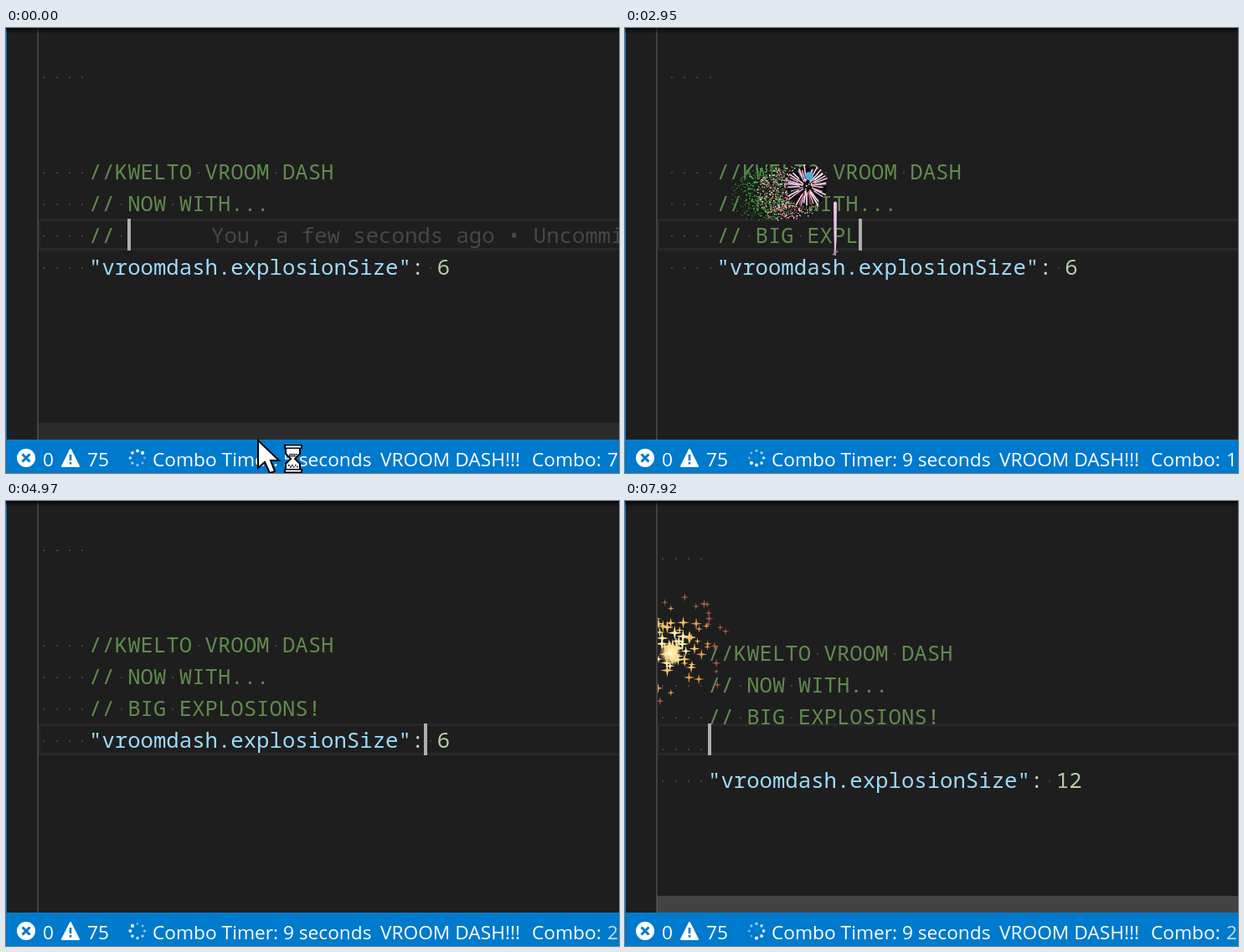
Animation of 732x532 px, one loop 8 s. Source, as an HTML page with a canvas:

```html
<!DOCTYPE html>
<html lang="en">
<head>
<meta charset="utf-8">
<title>Typing fireworks</title>
<style>
  html, body { margin: 0; width: 732px; height: 532px; overflow: hidden; background: #1e1e1e; }
  canvas { display: block; }
</style>
</head>
<body>
<canvas id="stage" width="732" height="532"></canvas>
<script>
const ctx = document.getElementById('stage').getContext('2d');
const LOOP = 8000, W = 732, H = 532, BAR = 492;
const LEFT = 37.4, CH = 15.4;
const CODE = '25.67px "Noto Sans Mono", "DejaVu Sans Mono", monospace';
const UI = '22.7px "Open Sans", "Noto Sans", sans-serif';
const GREEN = '#608b4e';

const PHRASE = 'BIG EXPLOSIONS!';
const KEYS = [1770, 1920, 2080, 2240, 2470, 2620, 2780, 2900,
              3100, 3260, 3420, 3590, 3700, 3790, 3970];
const EDITS = [5710, 5870, 6050, 7690];
const PRESSES = KEYS.concat(EDITS);

// start, x, y, kind, scale
const BLASTS = [
  [1770, 142, 190, 'rays', 1], [1920, 157, 190, 'rays', 1],
  [2080, 173, 188, 'rays', 1], [2240, 188, 190, 'rays', 1],
  [2470, 204, 188, 'rays', 1], [2620, 217, 189, 'rays', 1],
  [2900, 251, 188, 'rays', 1],
  [3140, 222, 206, 'teal', 1], [3220, 312, 208, 'pink', 1],
  [3260, 252, 212, 'pink', 1], [3300, 257, 190, 'fall', 1],
  [3420, 340, 214, 'pink', 1], [3400, 295, 212, 'teal', .9],
  [3600, 259, 181, 'ring', 1], [3630, 320, 181, 'ring', 1],
  [3640, 351, 181, 'ring', 1], [3580, 362, 207, 'stars', 1],
  [3760, 266, 203, 'flash', 1], [3970, 366, 206, 'stars', .95],
  [5720, 44, 236, 'rays', .8], [6270, 52, 228, 'rays', .87],
  [7690, 52, 212, 'rocket', 1], [7910, 54, 176, 'stars', 1.9]
];

const count = (list, t) => list.filter(k => k <= t).length;
const rowY = r => 58 + 38 * r;
const clamp = v => Math.max(0, Math.min(1, v));

function rng(seed) {
  let i = 0;
  return () => {
    const v = Math.sin(++i * 12.9898 + seed * 78.233) * 43758.5453;
    return v - Math.floor(v);
  };
}

function rect(color, x, y, w, h) {
  ctx.fillStyle = color;
  ctx.fillRect(x, y, w, h);
}

function disc(color, x, y, r) {
  ctx.fillStyle = color;
  ctx.beginPath();
  ctx.arc(x, y, r, 0, 7);
  ctx.fill();
}

function poly(points, fill, stroke) {
  ctx.beginPath();
  points.forEach(p => ctx.lineTo(p[0], p[1]));
  ctx.closePath();
  if (fill) { ctx.fillStyle = fill; ctx.fill(); }
  if (stroke) { ctx.strokeStyle = stroke; ctx.lineWidth = 2; ctx.stroke(); }
}

function label(text, x, y, color) {
  ctx.fillStyle = color;
  ctx.fillText(text, x, y);
}

// ---- editor ----

function shake(t) {
  if (t < 1770 || (t >= 4820 && t < 5710)) return [0, 0];
  if (t >= 6530) return [0, 10];
  return [10.4, 0];
}

function caret(t) {
  let c = { row: 5, col: 7, since: 0 };
  const n = count(KEYS, t);
  if (n) c = { row: 5, col: 7 + n, since: KEYS[n - 1] };
  const moves = [[4820, 6, 22], [4900, 6, 30], [5150, 6, 32], [5710, 6, 31],
                 [5870, 6, 32], [6050, 6, 33], [7230, 5, 22], [7690, 6, 4]];
  for (const [since, row, col] of moves) if (t >= since) c = { row, col, since };
  return c;
}

// parts: [text, color] pairs laid out on the character grid
function codeLine(row, parts, dx, dy) {
  let col = 0;
  const y = rowY(row) + dy;
  for (const [text, color] of parts) {
    label(text, LEFT + dx + col * CH, y + 9, color);
    for (const ch of text) {
      if (ch === ' ') rect('#424242', Math.round(LEFT + dx + (col + .5) * CH - 1), y, 2, 2);
      col++;
    }
  }
}

function editor(t) {
  const [dx, dy] = shake(t), c = caret(t), y = rowY(c.row);
  const box = '#282828';
  rect(box, 39, y - 20, W, 3);
  rect(box, 39, y + 15, W, 3);
  rect(box, 39, y - 20, 2, 38);

  ctx.font = CODE;
  const indent = ['    ', GREEN];
  codeLine(0, [indent], dx, dy);
  codeLine(3, [indent, ['//KWELTO VROOM DASH', GREEN]], dx, dy);
  codeLine(4, [indent, ['// NOW WITH...', GREEN]], dx, dy);
  codeLine(5, [indent, ['// ' + PHRASE.slice(0, count(KEYS, t)), GREEN]], dx, dy);
  const size = t < 5710 ? '6' : '12'.slice(0, count(EDITS, t) - 1);
  const split = t >= 7690;
  if (split) codeLine(6, [indent], dx, dy);
  codeLine(split ? 7 : 6, [indent, ['"vroomdash.explosionSize"', '#9cdcfe'],
    [': ', '#d4d4d4'], [size, '#b5cea8']], dx, dy);
  if (t < 1770) label('You, a few seconds ago • Uncommitted changes', 245, rowY(5) + 9, '#474747');

  if ((t - c.since) % 1000 < 500)
    rect('#aeafad', Math.round(LEFT + c.col * CH + dx), y - 20, 4, 38);
}

// ---- fireworks ----

function dots(x, y, r, n, colors, seed, inner = 0, drop = 0) {
  const rnd = rng(seed);
  for (let i = 0; i < n; i++) {
    const a = rnd() * 6.283, d = r * Math.sqrt(inner + (1 - inner) * rnd());
    const px = x + Math.cos(a) * d, py = y + Math.sin(a) * d + drop * rnd();
    rect(colors[Math.floor(rnd() * colors.length)], Math.round(px), Math.round(py), 1.4, 1.4);
  }
}

function spokes(x, y, r, n, colors, seed, inner, width) {
  const rnd = rng(seed);
  ctx.lineWidth = width;
  for (let i = 0; i < n; i++) {
    const a = i / n * 6.283 + rnd() * .12, r1 = r * (.72 + .28 * rnd());
    const r0 = r * inner * (.5 + rnd());
    const c = Math.cos(a), s = Math.sin(a);
    ctx.strokeStyle = colors[Math.floor(rnd() * colors.length)];
    ctx.beginPath();
    ctx.moveTo(x + c * r0, y + s * r0);
    ctx.lineTo(x + c * r1, y + s * r1);
    ctx.stroke();
  }
}

function glint(x, y, r, color) {
  const w = Math.max(.7, r * .16);
  poly([[x, y - r], [x + w, y - w], [x + r, y], [x + w, y + w],
        [x, y + r], [x - w, y + w], [x - r, y], [x - w, y - w]], color);
  disc(color, x, y, w * 1.3);
}

const draw = {
  rocket(x, y, age) {
    if (age > 220) return;
    poly([[x - 2, y + 21], [x, y + 19], [x + 2, y + 21], [x + 1.5, y + 60],
          [x + .7, y + 84], [x - .7, y + 84], [x - 1.5, y + 60]], '#efc0ea');
    dots(x, y + 80, 4, 10, ['#8a6a88', '#d8b0d0'], x);
  },

  rays(x, y, age, s, seed) {
    if (age < 220) return draw.rocket(x, y, age);
    if (age < 470) {
      const r = 30 * s * Math.min(1, Math.sqrt((age - 220) / 250) * 1.35);
      disc('rgba(12,8,12,.75)', x, y, r * .9);
      spokes(x, y, r, 46, ['#fff', '#ffd9ec', '#f0a8c8', '#c04a60', '#0c0a0c', '#b8b4e0'],
        seed, .3, 1.5);
      dots(x, y, r * .35, 14, ['#fff', '#f4c4dc'], seed);
      if (age < 400 && s === 1) disc('#55a8dc', x + 3, y - 12, 5);
      return;
    }
    const k = (age - 470) / 680;
    if (k > 1) return;
    ctx.globalAlpha = Math.min(1, (1 - k) * 3.5);
    const colors = k < .45
      ? ['#0b0b0b', '#0b0b0b', '#f6e4ea', '#e0606e', '#111', '#f09ab0', '#3b9a40']
      : ['#0b0b0b', '#111', '#2f9a35', '#43c044', '#1d5a22'];
    dots(x, y + 8, 32 * s, k < .45 ? 720 : 520, colors, seed);
  },

  ring(x, y, age, s, seed) {
    if (age < 420) {
      const r = 16 * Math.sqrt(clamp(age / 200));
      ctx.globalAlpha = clamp((420 - age) / 120);
      disc('#17120c', x, y, r * .9);
      spokes(x, y, r, 26, ['#ffd873', '#e9b04e', '#fff0b8'], seed, .48, 1.9);
      dots(x, y, r * .4, 7, ['#f0c060', '#7a5a20'], seed);
    } else if (age < 900) {
      ctx.globalAlpha = (900 - age) / 480;
      dots(x, y + 5, 17, 90, ['#d8a44c', '#8a6230', '#111'], seed, .3, 8);
    }
  },

  pink(x, y, age, s, seed) {
    const k = age / 1150;
    ctx.globalAlpha = clamp((1 - k) * 2.2);
    dots(x, y, 25 * Math.sqrt(clamp(k * 2.5)), 260,
      ['#b9548e', '#8d4470', '#d987b4', '#191015'], seed, .3, 4);
  },

  teal(x, y, age, s, seed) {
    const k = age / 1150;
    ctx.globalAlpha = clamp((1 - k) * 2);
    dots(x, y, 31 * s * Math.sqrt(clamp(k * 2.5)), 130,
      ['#4b8d8c', '#7ec2c0', '#2c5454', '#111'], seed, .72);
  },

  fall(x, y, age, s, seed) {
    const k = age / 1000;
    ctx.globalAlpha = clamp((1 - k) * 2.4);
    dots(x, y - 2, 22 * Math.sqrt(clamp(k * 3)), 260,
      ['#2faa35', '#1e7424', '#55d858', '#0d130d'], seed, .1, 18 * k);
  },

  flash(x, y, age) {
    if (age > 240) return;
    ctx.globalAlpha = clamp((240 - age) / 90);
    disc('#ffe2c4', x, y, 8.5);
    spokes(x, y, 9, 12, ['#fff'], 3, .3, 1.6);
    disc('#e49b70', x, y, 2);
  },

  stars(x, y, age, s, seed) {
    const k = age / 760;
    if (k > 1) return;
    const rnd = rng(seed), R = 42 * s * (.94 + .06 * clamp(age / 200));
    ctx.globalAlpha = clamp((1 - k) * 2.2);
    // outer sparks first so the bright heart stays on top
    for (let i = 110; i > 0; i--) {
      const q = Math.pow(i / 110, 1.05), a = rnd() * 6.283;
      const tint = q < .3 ? '#fff0b4' : q < .5 ? '#f8c468' : q < .72 ? '#e09a4c' : '#a85a4a';
      const r = (.7 + .6 * rnd()) * (3.4 + 1.6 * s) * (1.15 - q * .5);
      glint(x + Math.cos(a) * R * q * .92, y + Math.sin(a) * R * q, r, tint);
    }
    const core = 9 * (1 - k) * Math.sqrt(s) + 1;
    const glow = ctx.createRadialGradient(x, y + 6, 0, x, y + 6, core);
    glow.addColorStop(0, '#fffbe0');
    glow.addColorStop(.5, 'rgba(255,228,150,.85)');
    glow.addColorStop(1, 'rgba(235,150,60,0)');
    disc(glow, x, y + 6, core);
  }
};

function fireworks(t) {
  for (const [start, x, y, kind, s] of BLASTS) {
    const age = t - start;
    if (age < 0 || age > 1150) continue;
    ctx.save();
    draw[kind](x, y, age, s, start % 97 + x);
    ctx.restore();
  }
}

// ---- status bar ----

function spinner(t) {
  const head = Math.floor(t / 80);
  for (let i = 0; i < 8; i++) {
    const a = i * Math.PI / 4, fade = ((i - head) % 8 + 8) % 8;
    disc(`rgba(255,255,255,${.4 + fade * .085})`,
      157 + Math.cos(a) * 8.6, 514 + Math.sin(a) * 8.6, 1.4 + fade * .1);
  }
}

function timer(t) {
  if (t < 640) return 5;
  if (t < 1640) return 4;
  if (t < 1770) return 3;
  const last = PRESSES[count(PRESSES, t) - 1];
  return 9 - Math.floor((t - last) / 1100);
}

function statusBar(t) {
  const blue = '#007acc', white = '#fff';
  rect(blue, 0, BAR, W, H - BAR);
  disc(white, 24, 514, 11);
  ctx.strokeStyle = blue;
  ctx.lineWidth = 3;
  ctx.beginPath();
  ctx.moveTo(19.5, 509.5); ctx.lineTo(28.5, 518.5);
  ctx.moveTo(28.5, 509.5); ctx.lineTo(19.5, 518.5);
  ctx.stroke();
  ctx.lineJoin = 'round';
  poly([[77, 504], [87, 524], [67, 524]], white, white);
  rect(blue, 75.7, 510, 2.6, 7);
  rect(blue, 75.7, 519, 2.6, 2.6);
  spinner(t);

  ctx.font = UI;
  label('0', 44, 524, white);
  label('75', 97, 524, white);
  label(`Combo Timer: ${timer(t)} seconds`, 175, 524, white);
  label('VROOM DASH!!!', 447, 524, white);
  label('Combo:', 628, 524, white);
  const combo = 7 + count(PRESSES, t);
  label(String(combo), 718, 524, combo >= 20 ? '#c3dff2' : white);
}

function pointer(t) {
  const y = t < 80 ? 0 : (t - 80) * .2;
  if (y > 44) return;
  ctx.save();
  ctx.translate(301, 492 + y);
  ctx.lineJoin = 'miter';
  poly([[0, 1], [0, 34], [8, 27], [14, 40], [20, 38], [15, 25], [25, 25]], '#fff', '#000');
  poly([[33, 10], [50, 10], [50, 17], [44, 23], [50, 29], [50, 36], [33, 36],
        [33, 29], [39, 23], [33, 17]], '#fff', '#000');
  rect('#000', 31, 6, 22, 5);
  rect('#000', 31, 35, 22, 5);
  rect('#fff', 33, 7.5, 18, 2);
  rect('#fff', 33, 36.5, 18, 2);
  for (let i = 0; i < 9; i++) {
    rect('#000', 37 + i % 5 * 2, 17 + (i % 2) * 2, 1.5, 1.5);
    rect('#000', 36 + i % 6 * 2, 30 + (i % 2) * 2, 1.5, 1.5);
  }
  ctx.restore();
}

function render(t) {
  rect('#1e1e1e', 0, 0, W, H);
  ctx.save();
  ctx.beginPath();
  ctx.rect(37, 0, W - 37, BAR);
  ctx.clip();
  editor(t);
  fireworks(t);
  ctx.restore();

  rect('#404040', 37, 0, 2, BAR);
  rect('#007acc', 0, 0, 1, BAR);
  const bar = t >= 7690 ? .4 : .14 * clamp(1 - (t - 80) / 400);
  if (bar > 0) rect(`rgba(121,121,121,${bar})`, 38, 472, W, 20);
  const shade = ctx.createLinearGradient(0, 0, 0, 7);
  shade.addColorStop(0, 'rgba(0,0,0,.75)');
  shade.addColorStop(1, 'rgba(0,0,0,0)');
  rect(shade, 0, 0, W, 7);
  statusBar(t);
  pointer(t);
}

function tick(now) {
  render(now % LOOP);
  requestAnimationFrame(tick);
}
render(0);
requestAnimationFrame(tick);
</script>
</body>
</html>
```
